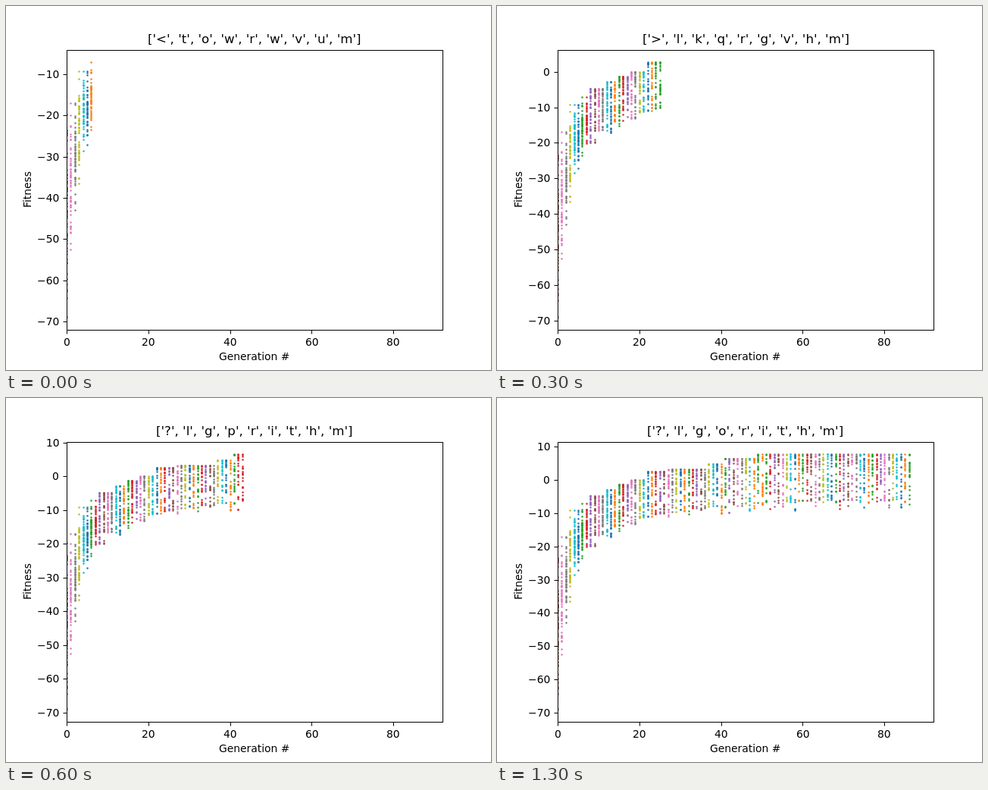
These frames come from a looping animation (640x480 px, 1400 ms). An HTML page with a canvas:

```html
<!DOCTYPE html>
<html lang="en">
<head>
<meta charset="utf-8">
<title>Fitness by generation</title>
<style>
html, body { margin: 0; width: 100%; height: 100%; overflow: hidden; background: #fff; }
canvas { display: block; }
</style>
</head>
<body>
<canvas id="plot" width="640" height="480"></canvas>
<script>
const ctx = document.getElementById('plot').getContext('2d');
const FONT = '"DejaVu Sans", sans-serif';
const COLORS = ['#1f77b4', '#ff7f0e', '#2ca02c', '#d62728', '#9467bd',
  '#8c564b', '#e377c2', '#7f7f7f', '#bcbd22', '#17becf'];
const STEP = 100, STEPS = 14, GENS = 87;
const BOX = { x: 80, y: 57.6, w: 496, h: 369.6 };
const MID_X = BOX.x + BOX.w / 2, MID_Y = BOX.y + BOX.h / 2;
const WORST = -69;

// Best letters at each step; the last entry stays
const TITLES = ['<towrwvum', '<lowrwvhm', '<lowrgvhm', '>lkqrgvhm',
  '>lkqrgthm', '?lgqrgthm', '?lgprithm', '?lgorithm'];

// Improvements of the best fitness: [generation, value]
const BEST = [[0, -19.8], [1, -17], [3, -9.2], [6, -7.1], [8, -4.8], [12, -2.9], [15, -1.3],
  [18, 0], [22, 2.6], [27, 3.3], [37, 4.9], [41, 6.5], [49, 7.7]];

const bestAt = g => BEST.filter(([from]) => from <= g).pop()[1];

// The worst individuals improve fast at first, then slowly
const lowAt = g => -5.5 - 45.5 * Math.exp(-g / 2.4) - 18 * Math.exp(-g / 18);

function random(seed) {
  let s = seed * 7919 + 17;
  return () => {
    s = (s + 0x6D2B79F5) | 0;
    let t = Math.imul(s ^ (s >>> 15), 1 | s);
    t = (t + Math.imul(t ^ (t >>> 7), 61 | t)) ^ t;
    return ((t ^ (t >>> 14)) >>> 0) / 4294967296;
  };
}

function population(g) {
  const rnd = random(g + 1);
  const best = bestAt(g);
  const low = Math.max(WORST, lowAt(g) - 3 * rnd() ** 3);
  const count = 18 + 36 * Math.exp(-g / 14);
  const list = [best, low];
  for (let i = 0; i < count; i++) {
    // Early generations gather in the middle, later ones near the best
    const u = g < 8 ? (rnd() + rnd()) / 2 : rnd() ** 1.4;
    list.push(best + (low - best) * u);
  }
  return list;
}

const runs = Array.from({ length: GENS }, (_, g) => population(g));

const lastGen = k => 6 * k + 6 + (k < 1 ? 0 : k < 7 ? 1 : 2);

// Each step plots seven generations; the first of them is plotted again
function colorOf(g, k) {
  const s = g < 50 ? g : g - 2;
  const repeats = Math.min(k, Math.floor(s / 6));
  return COLORS[Math.min(s + 5 + repeats, 7 * k + 11) % 10];
}

const px = v => Math.floor(v + 0.5) + 0.5;

function line(x1, y1, x2, y2) {
  ctx.beginPath();
  ctx.moveTo(x1, y1);
  ctx.lineTo(x2, y2);
  ctx.stroke();
}

// Text starts on a whole pixel; anchor is 0.5 for centred, 1 for right-aligned
function text(str, x, y, anchor = 0.5, size = 13.889) {
  ctx.font = size + 'px ' + FONT;
  const left = x - ctx.measureText(str).width * anchor;
  ctx.fillText(str, Math.round(left), Math.round(y));
}

function drawDots(k, end, yOf) {
  ctx.save();
  ctx.beginPath();
  ctx.rect(BOX.x, BOX.y, BOX.w, BOX.h);
  ctx.clip();
  for (let g = 0; g <= end; g++) {
    const x = px(BOX.x + g * BOX.w / 92);
    ctx.fillStyle = colorOf(g, k);
    for (const v of runs[g]) {
      ctx.beginPath();
      ctx.arc(x, px(yOf(v)), 1.25, 0, 2 * Math.PI);
      ctx.fill();
    }
  }
  ctx.restore();
}

function drawAxes(k, top, yOf) {
  const left = px(BOX.x), bottom = px(BOX.y + BOX.h);
  ctx.strokeStyle = ctx.fillStyle = '#000';
  ctx.lineWidth = 1;
  ctx.strokeRect(left, px(BOX.y), BOX.w, bottom - px(BOX.y));

  for (let g = 0; g <= 80; g += 20) {
    const x = BOX.x + g * BOX.w / 92;
    line(px(x), bottom, px(x), bottom + 5);
    text(g, x, 448);
  }
  for (let v = -70; v <= top; v += 10) {
    const y = yOf(v);
    line(left - 5, px(y), left, px(y));
    text(v < 0 ? '\u2212' + -v : v, 70.3, y + 5, 1);
  }

  text('Generation #', MID_X, 467);
  ctx.save();
  ctx.translate(33, Math.round(MID_Y));
  ctx.rotate(-Math.PI / 2);
  text('Fitness', 0, 0);
  ctx.restore();

  const letters = [...TITLES[Math.min(k, TITLES.length - 1)]].map(c => `'${c}'`);
  text(`[${letters.join(', ')}]`, MID_X, 49, 0.5, 16.667);
}

function draw(k) {
  const end = lastGen(k);
  const best = bestAt(end);
  const margin = (best - WORST) * 0.05;
  const top = best + margin;
  const scale = BOX.h / (top - WORST + margin);
  const yOf = v => BOX.y + (top - v) * scale;

  ctx.fillStyle = '#fff';
  ctx.fillRect(0, 0, 640, 480);
  drawDots(k, end, yOf);
  drawAxes(k, top, yOf);
}

let start = null, shown = -1;
function tick(now) {
  start ??= now;
  const k = Math.floor((now - start) / STEP) % STEPS;
  if (k !== shown) draw(shown = k);
  requestAnimationFrame(tick);
}
draw(0);
requestAnimationFrame(tick);
</script>
</body>
</html>
```
